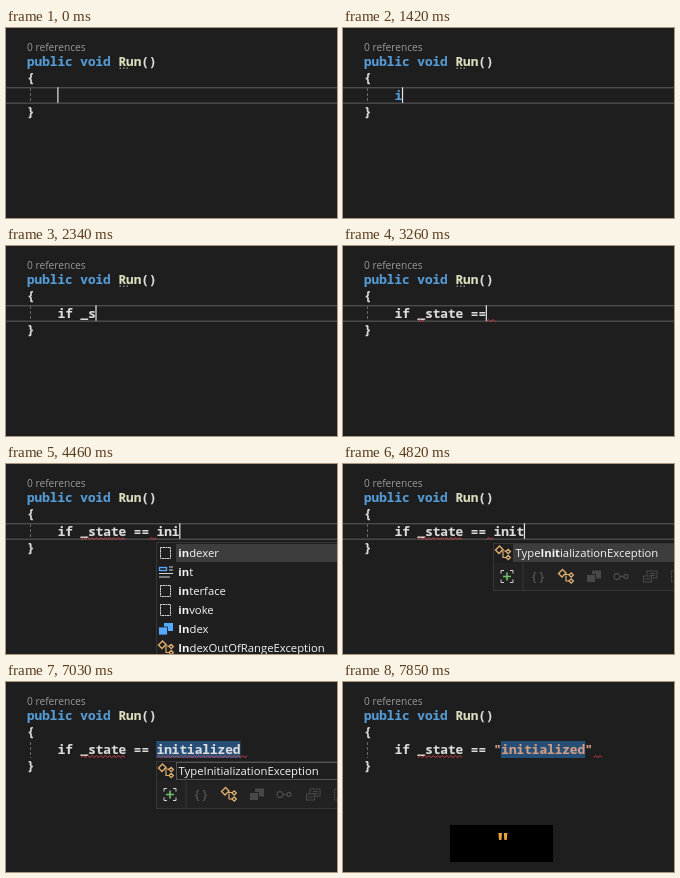
An HTML page that plays this animation: 331x190 px, repeating every 8000 ms.

```html
<!DOCTYPE html>
<html lang="en">
<head>
<meta charset="utf-8">
<title>Code completion</title>
<style>
  html, body { margin: 0; width: 100%; height: 100%; overflow: hidden; background: #1e1e1e; }
  svg { display: block; width: 100vw; height: 100vh; }
  text { white-space: pre; }
  .code { font: 600 12.7px "Noto Sans Mono", monospace; stroke-width: .15; }
  .ui { font: 11.3px "Open Sans", sans-serif; fill: #f4f4f4; }
  .ui tspan { font-weight: 700; }
  .lens { font: 10.2px "Open Sans", sans-serif; fill: #999; }
  .key { font: 700 26px "Open Sans", sans-serif; fill: #e9a33a; }
</style>
</head>
<body>
<svg id="stage" viewBox="0 0 331 190"></svg>
<script>
const LOOP = 8000, CW = 7.62, X0 = 51.7;
const WHITE = '#dcdcdc', BLUE = '#569cd6', STRING = '#d69d85', GOLD = '#e0b070', DIM = '#484848';
const LINE = 'if _state == initialized';
const START = 13;
// Time of each key press in LINE
const KEYS = [1420, 1680, 1810, 2070, 2340, 2450, 2570, 2680, 2790, 2900, 3020, 3130,
  3530, 4060, 4260, 4460, 4760, 5290, 5360, 5500, 5570, 5640, 5700, 5770];
const CARET_OFF = [[420, 890], [6300, 6500], [7030, 7230], [7780, LOOP]];
const SELECT = 6500, QUOTE = 7230, OVERLAY = 7360;

const stage = document.getElementById('stage');
const within = (t, a, b) => t >= a && t < b;
const col = n => X0 + n * CW;
const rect = (x, y, w, h, fill, extra = '') =>
  `<rect x="${x}" y="${y}" width="${w}" height="${h}" fill="${fill}" ${extra}/>`;
const path = (d, stroke, width = 1, fill = 'none') =>
  `<path d="${d}" stroke="${stroke}" stroke-width="${width}" fill="${fill}"/>`;
const code = (x, y, s, color) =>
  `<text class="code" x="${x}" y="${y}" fill="${color}" stroke="${color}">${s}</text>`;
const label = (x, y, s) => `<text class="ui" x="${x}" y="${y}">${s}</text>`;
const mark = (s, from, n) =>
  n ? s.slice(0, from) + `<tspan>${s.slice(from, from + n)}</tspan>` + s.slice(from + n) : s;

function squiggle(x, end) {
  let d = `M${x} 75.6`;
  for (let i = 1; x + i * 2.2 <= end; i++) d += `L${x + i * 2.2} ${i % 2 ? 73.6 : 75.6}`;
  return path(d, '#d8434a', 0.9);
}

const icons = {
  keyword: (c = '#d4d4d4') =>
    rect(-5.5, -5.5, 10, 11, 'none', `stroke="${c}" stroke-dasharray="2 .5"`),
  snippet: () =>
    path('M3-5H7M3-2H7M-7 1.5H7M-7 5H4', '#d4d4d4', 1.2) + rect(-6.5, -4.5, 7, 3, 'none', 'stroke="#55aaff" stroke-width="1.3"'),
  struct: (c = '#55aaff') => rect(-2, -6, 9, 8, c) + rect(-7.5, -2, 9, 8, c, 'stroke="#1f1f1f" stroke-width=".8"'),
  type: () =>
    path('M-7.5-3L-3.5-7L0-3.5L-4 .5Z', GOLD, 1.4) + path('M-2-2H3M0-1V4.5H3', GOLD, 1.2) +
    path('M3-1.5L5.2-3.7L7.4-1.5L5.2 .7ZM3 4.5L5.2 2.3L7.4 4.5L5.2 6.7Z', GOLD, 1.3),
  contract: () =>
    `<circle cx="-4" r="3" fill="none" stroke="${DIM}" stroke-width="1.3"/>` +
    `<circle cx="5" r="2" fill="none" stroke="${DIM}" stroke-width="1.3"/>` + path('M-1 0H3', DIM, 1.3),
  method: () => rect(-3, -5.5, 10, 7, 'none', `stroke="${DIM}"`) + path('M0-3H5M0-1H5', DIM) +
    rect(-6.5, -.5, 8, 6, '#222', `stroke="${DIM}"`) + path('M-5 2.5H0', DIM),
  expand: () => path('M-6-3V-6H-3M3-6H6V-3M6 3V6H3M-3 6H-6V3', '#d4d4d4') + path('M-4 0H4M0-4V4', '#6cc26c', 1.6)
};
const icon = (name, x, y, ...colors) => `<g transform="translate(${x} ${y})">${icons[name](...colors)}</g>`;

const ROWS_I = [['keyword', 'if'], ['keyword', 'indexer'], ['snippet', 'int'],
  ['keyword', 'interface'], ['keyword', 'invoke'], ['keyword', 'iterator']];
const ROWS_IN = [...ROWS_I.slice(1, 5), ['struct', 'Index'], ['type', 'IndexOutOfRangeException']];

function list(x, rows, bold) {
  return rect(x + .5, 78.5, 340, 130, '#1f1f1f', 'stroke="#363636"') +
    rect(x + 20, 80, 320, 18, '#3d3d3d') +
    rows.map(([kind, name], i) => {
      const y = 89 + i * 19;
      return icon(kind, x + 10, y) + label(x + 22.3, y + 4, mark(name, 0, bold));
    }).join('');
}

function typePopup(bold, soft) {
  const row = soft ? rect(170.5, 80.5, 200, 17, 'none', 'stroke="#555"') : rect(170, 80, 200, 18, '#3d3d3d');
  return rect(150.5, 79.5, 200, 47, '#1f1f1f', 'stroke="#363636"') +
    rect(151, 99, 200, 27, '#222') + row +
    icon('type', 160, 89) + label(172.5, 93, mark('TypeInitializationException', 4, bold)) +
    path('M180 99V126', '#363636') +
    icon('expand', 164, 112.5) +
    `<text class="ui" x="195" y="116.5" text-anchor="middle" style="fill:#626262;font-size:12.5px">{ }</text>` +
    icon('type', 223, 112.5) + icon('struct', 251, 112.5, DIM) + icon('contract', 278, 112.5) +
    icon('method', 307, 112.5) + icon('keyword', 334, 112.5, DIM);
}

const BASE = rect(0, 0, 331, 190, '#1e1e1e') +
  '<text class="lens" x="21" y="23">0 references</text>' +
  code(21, 37.7, 'public void', BLUE) + code(21 + 12 * CW, 37.7, 'Run', '#dfdfc0') +
  code(21 + 15 * CW, 37.7, '()', WHITE) +
  code(21, 53.8, '{', WHITE) + code(21, 88, '}', WHITE) +
  '<path d="M24.5 60V76" stroke="#686868" stroke-dasharray="3 2"/>';
const HINT = [113.5, 117, 120.5].map(x => rect(x, 39.5, 1.5, 1.3, '#999')).join('');

function errors(t, count) {
  let s = '';
  if (t >= 3660) s += squiggle(75, 120);
  else if (t >= 2450) s += squiggle(75, 82);
  if (t >= QUOTE) s += squiggle(250.5, 260);
  else if (t >= 5020) s += squiggle(151, col(count) + 8);
  else if (t >= 4060) s += squiggle(143.5, 151);
  else if (t >= 3530) s += squiggle(151, 160);
  else if (t >= 3260) s += squiggle(143.5, 153);
  return s;
}

function popup(t, count) {
  if (within(t, 1550, 1810)) return list(51, ROWS_I, 1);
  if (within(t, 4260, 4530)) return list(150, ROWS_IN, 2);
  if (!within(t, 4620, QUOTE)) return '';
  const soft = t >= 5840;
  return typePopup(soft ? 0 : Math.min(count - START, 9), soft);
}

function draw(t) {
  const count = KEYS.filter(k => k <= t).length;
  const selected = t >= SELECT, quoted = t >= QUOTE;
  let s = BASE;
  if (t < 3530) s += HINT;
  if (selected) s += rect(col(START + quoted) - 0.5, 59, 11 * CW + 0.5, 17, '#264f78');
  else s += rect(0, 59, 331, 1.4, '#4c4c4c') + rect(0, 74.5, 331, 1.4, '#4c4c4c');

  if (quoted) s += code(X0, 71.7, LINE.slice(0, START), WHITE) + code(col(START), 71.7, '"initialized"', STRING);
  else s += code(X0, 71.7, LINE.slice(0, count), t < 1810 ? BLUE : WHITE);
  s += errors(t, count);

  if (!CARET_OFF.some(([a, b]) => within(t, a, b))) {
    const at = selected ? START + quoted : count;
    s += rect(col(at) - 0.4, 59.3, 1.2, 15.5, '#e4e4e4');
  }
  s += popup(t, count);
  if (t >= OVERLAY) {
    s += rect(107, 143, 103, 37, '#000') + '<text class="key" x="160" y="169.6" text-anchor="middle">"</text>';
  }
  return s;
}

let shown = '';
const begin = performance.now();
function tick() {
  const next = draw((performance.now() - begin) % LOOP);
  if (next !== shown) stage.innerHTML = shown = next;
  requestAnimationFrame(tick);
}
tick();
</script>
</body>
</html>
```
